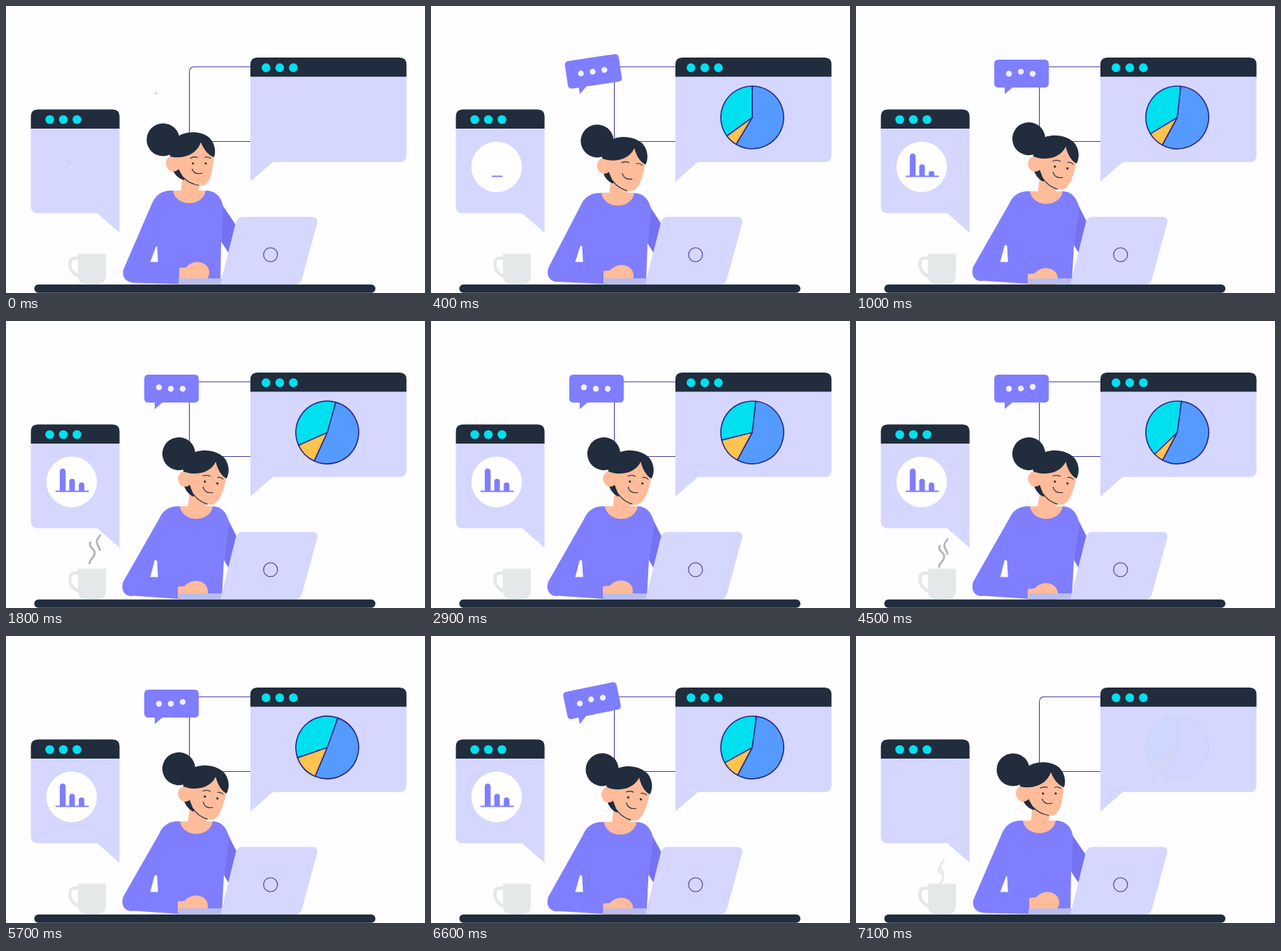
These frames come from a looping animation (600x412 px, 7.2 s). An HTML page:

```html
<!DOCTYPE html>
<html lang="en">
<head>
<meta charset="utf-8">
<title>Working at a laptop</title>
<style>
  html, body { margin: 0; width: 100%; height: 100%; overflow: hidden; background: #fefdff; }
  svg { display: block; width: 100%; height: 100%; }
  .dark { fill: #212c3c; }
  .lilac { fill: #d5d7ff; }
  .cyan { fill: #00e0ef; }
  .violet { fill: #7f7eff; }
  .skin { fill: #ffbc9a; }
  .cup { fill: #e5e8e9; }
  .wire { fill: none; stroke: #40369a; stroke-width: 1.1; }
  .ink { fill: none; stroke: #212c3c; stroke-width: 1.2; stroke-linecap: round; }
  .slice { stroke: #2b2a8a; stroke-width: 1.7; stroke-linejoin: round; }
  .steam { fill: none; stroke: #b5b7ba; stroke-width: 3; stroke-linecap: round; }
</style>
</head>
<body>
<svg viewBox="0 0 600 412">
  <path class="wire" d="M350 87.2H270Q262.6 87.2 262.6 95V187Q262.6 194.5 270 194.5H350"/>

  <g transform="translate(-.4 -.4)">
    <path class="lilac" d="M36 176V288Q36 298 46 298H131L163 326V176Z"/>
    <path class="dark" d="M36 176.500V159Q36 149 46 149H153Q163 149 163 159V176.500Z"/>
    <g class="cyan"><circle cx="63" cy="163.4" r="6.3"/><circle cx="82.5" cy="163.4" r="6.3"/><circle cx="102" cy="163.4" r="6.3"/></g>
  </g>
  <path class="lilac" d="M350 101V252L382 224H563.5Q573.5 224 573.5 214V101Z"/>
  <path class="dark" d="M350 101.5V84Q350 74 360 74H563.5Q573.5 74 573.5 84V101.5Z"/>
  <g class="cyan"><circle cx="372.3" cy="88.6" r="6.3"/><circle cx="392" cy="88.6" r="6.3"/><circle cx="411.5" cy="88.6" r="6.3"/></g>

  <g id="pie">
    <path class="slice" fill="#559bff"/>
    <path class="slice" fill="#ffc34f"/>
    <path class="slice" fill="#00e0ef"/>
  </g>

  <g id="badge">
    <circle cx="94" cy="231" r="36.2" fill="#fff"/>
    <g id="bars" class="violet">
      <path d="M77 244.5V216a4.2 4.2 0 0 1 8.4 0V244.5Z"/>
      <path d="M90.6 244.5V230.6a4 4 0 0 1 8 0V244.5Z"/>
      <path d="M104.2 244.5V235.8a4 4 0 0 1 8 0V244.5Z"/>
    </g>
    <path id="axis" stroke="#7f7eff" stroke-width="2" stroke-linecap="round"/>
  </g>

  <g id="bubble">
    <path class="violet" d="M204 77H270Q276 77 276 83V111Q276 117 270 117H224L213 126.5V117H204Q198 117 198 111V83Q198 77 204 77Z"/>
    <g id="dots" fill="#f1f0ff"><circle cx="219" cy="97.3" r="4.2"/><circle cx="236" cy="97.3" r="4.2"/><circle cx="253" cy="97.3" r="4.2"/></g>
  </g>

  <g id="steam">
    <path class="steam" d="M119 353C119 346 128 345 126 336C124 331 117 330 120 323"/>
    <path class="steam" d="M131 334C130 328 125 326 127 320C128 316 131 315 131 313"/>
  </g>
  <path class="cup" d="M103 355.5H143V387Q143 399 131 399H115Q103 399 103 387Z"/>
  <path d="M104 362H97C89 363 91 376 95 381C98 385 101 387 105 388" fill="none" stroke="#e5e8e9" stroke-width="4.6"/>

  <path id="arm" fill="#7472f0"/>
  <path id="torso" class="violet"/>
  <path id="gap" fill="#fefdff"/>
  <path id="collar" class="skin"/>
  <path id="neck" class="skin"/>

  <g id="head">
    <circle class="dark" cx="225" cy="192" r="23.6"/>
    <path class="dark" d="M237 230Q241 246 255 250L256 232Z"/>
    <ellipse class="skin" cx="239.5" cy="226" rx="10.5" ry="11.5"/>
    <path class="skin" d="M240 212C242 226 248 236 254 246C262 255 274 259 282 257.5C292 255 296 240 297.5 214L280 194Z"/>
    <path class="dark" d="M235 216C250 220 273 215 279 195.5C284 208 291 215 298 217C301 208 299 196 290 188C280 180 262 179 250 185C240 190 233 203 235 216Z"/>
    <path class="ink" d="M254 246Q262 255 276 257.5"/>
    <path class="ink" d="M264 218.5Q269 215.5 274 217.3M285 217.3Q289 215.8 293 218.5M266.5 234Q270 243 281 240"/>
    <g id="eyes" class="dark"><circle cx="267.8" cy="226" r="1.6"/><circle cx="286" cy="226" r="1.6"/></g>
  </g>

  <path id="hand" class="skin" d="M248 375L258 374C262 369 268 366.5 275 366.5C285 367 291 374 291 381C291 387 289 391 284 391H248Z"/>
  <rect x="247" y="391" width="64" height="8.5" fill="#babdf0"/>
  <path class="lilac" d="M307 399.5L329 311Q331 302.8 339 302.8H439Q447.5 303 445.5 312L424 391Q422 399.5 414 399.5Z"/>
  <circle class="wire" cx="378.8" cy="357" r="10"/>
  <rect class="dark" x="40.5" y="399.7" width="488.5" height="12" rx="6"/>
</svg>
<script>
const LOOP = 7200;
const $ = id => document.getElementById(id);
const set = (el, name, value) => el.setAttribute(name, value);
const clamp = x => Math.max(0, Math.min(1, x));
const smooth = x => x * x * (3 - 2 * x);
const mix = (a, b, k) => a + (b - a) * k;
const ramp = (t, from, to) => smooth(clamp((t - from) / (to - from)));
const bump = (t, from, to) => Math.sin(Math.PI * clamp((t - from) / (to - from)));
// Rises to 1 at the start of the loop and falls back at its end.
const stay = (t, from, full, leave, gone) => ramp(t, from, full) * (1 - ramp(t, leave, gone));

// Time, start of the blue slice, end of the orange one (degrees from the top).
const SWEEP = [[400, 0, 234], [1800, 15.6, 246], [2900, 6.3, 256], [4500, 7.6, 226], [5700, 19.6, 251], [7000, 4, 238]];
const sweep = (t, col) => SWEEP.slice(1).reduce(
  (v, key, i) => v + (key[col] - SWEEP[i][col]) * ramp(t, SWEEP[i][0], key[0]), SWEEP[0][col]);

function drawPie(t) {
  const a = sweep(t, 1);
  const cuts = [a, 211 - .42 * a, sweep(t, 2), a + 360];
  const rim = deg => {
    const r = deg * Math.PI / 180;
    return `${460 + 45 * Math.sin(r)} ${160 - 45 * Math.cos(r)}`;
  };
  [...$("pie").children].forEach((el, i) => {
    const big = cuts[i + 1] - cuts[i] > 180 ? 1 : 0;
    set(el, "d", `M460 160L${rim(cuts[i])}A45 45 0 ${big} 1 ${rim(cuts[i + 1])}Z`);
  });
  set($("pie"), "opacity", stay(t, 60, 360, 6650, 7150));
}

function drawBadge(t, pop) {
  set($("badge"), "transform", `translate(94 231) scale(${pop}) translate(-94 -231)`);
  const w = 23 * ramp(t, 280, 610);
  set($("axis"), "d", `M${94.7 - w} 244.5H${94.7 + w}`);
  set($("axis"), "opacity", w > 0 ? 1 : 0);
  [...$("bars").children].forEach((el, i) => {
    const h = ramp(t, 450 + i * 150, 900 + i * 150);
    set(el, "transform", `translate(0 ${244.5 * (1 - h)}) scale(1 ${h})`);
  });
}

function drawBubble(t, pop) {
  const swing = -8.5 * bump(t, 0, 800) - 15 * bump(t, 6450, 6980);
  set($("bubble"), "transform", `translate(213.5 126) rotate(${swing}) scale(${pop}) translate(-213.5 -126)`);
  [...$("dots").children].forEach((el, i) => {
    const phase = (t + 500 - i * 220) % 1100;
    set(el, "transform", `translate(0 ${-3 * bump(phase, 0, 400)})`);
  });
}

function drawSteam(t) {
  const age = (t + 1500) % 2850;
  const rise = (age - 300) * .035;
  set($("steam"), "opacity", clamp(age / 200) * clamp((1200 - age) / 500));
  [...$("steam").children].forEach((el, i) =>
    set(el, "transform", `translate(${rise * (.15 + .5 * i)} ${-rise})`));
}

function drawWoman(t) {
  const k = stay(t, 0, 800, 6450, 7100), dip = Math.sin(Math.PI * k);
  const s = 10 * k, top = 265 + k + 3 * dip;

  set($("torso"), "d", `M${239 + s} ${top}c-15 -1 -25 6 -30 18.5L${170 - 2 * k} 374
    C163 388 172 397 183 ${397.5 - 3 * k}L248 399H${307 + 2 * k}L${308 + 4 * k} ${338 + 6 * k}
    L${311 + 9 * k} ${top + 24}C${309 + 7 * k} ${top + 9} ${300 + 9 * k} ${top} ${286 + s} ${top}Z`);
  set($("arm"), "d", `M${310 + 9 * k} ${top + 21}L${331 + 3 * k} 317L319 355L${308 + 4 * k} ${338 + 5 * k}Z`);
  set($("gap"), "d", `M${215 - 2 * k} ${345 - 2 * k}L206.5 367.5H217.700L216.300 ${345 - k}Z`);
  set($("collar"), "d", `M${239 + s} ${top}c4 24 43 24 47 0Z`);
  set($("neck"), "d", `M${253 + s} ${244 + 3 * k}L${250 + s} ${top + 4}h26L${277 + s} ${254 + 6 * k}Z`);

  set($("head"), "transform", `translate(${267.5 + 17 * k} ${226 + 4.5 * k + 4.5 * dip})
    rotate(${8.5 * k + 2.75 * dip}) translate(-267.5 -226)`);
  const open = clamp((Math.abs(k - .5) - .2) * 8);
  set($("eyes"), "transform", `translate(0 ${226 * (1 - open)}) scale(1 ${open})`);

  const tap = k * Math.max(0, Math.cos(2 * Math.PI * (t - 270) / 700)) ** 2;
  set($("hand"), "transform", `translate(${-2 * k} ${1 + 5 * k + 1.5 * dip + 4 * tap})`);
}

function draw(t) {
  const pop = mix(.03, 1, ramp(t, 0, 350)) * (1 - ramp(t, 6600, 6980));
  drawPie(t);
  drawBadge(t, pop);
  drawBubble(t, pop);
  drawSteam(t);
  drawWoman(t);
}

const start = performance.now();
function tick() {
  draw((performance.now() - start) % LOOP);
  requestAnimationFrame(tick);
}
tick();
</script>
</body>
</html>
```
